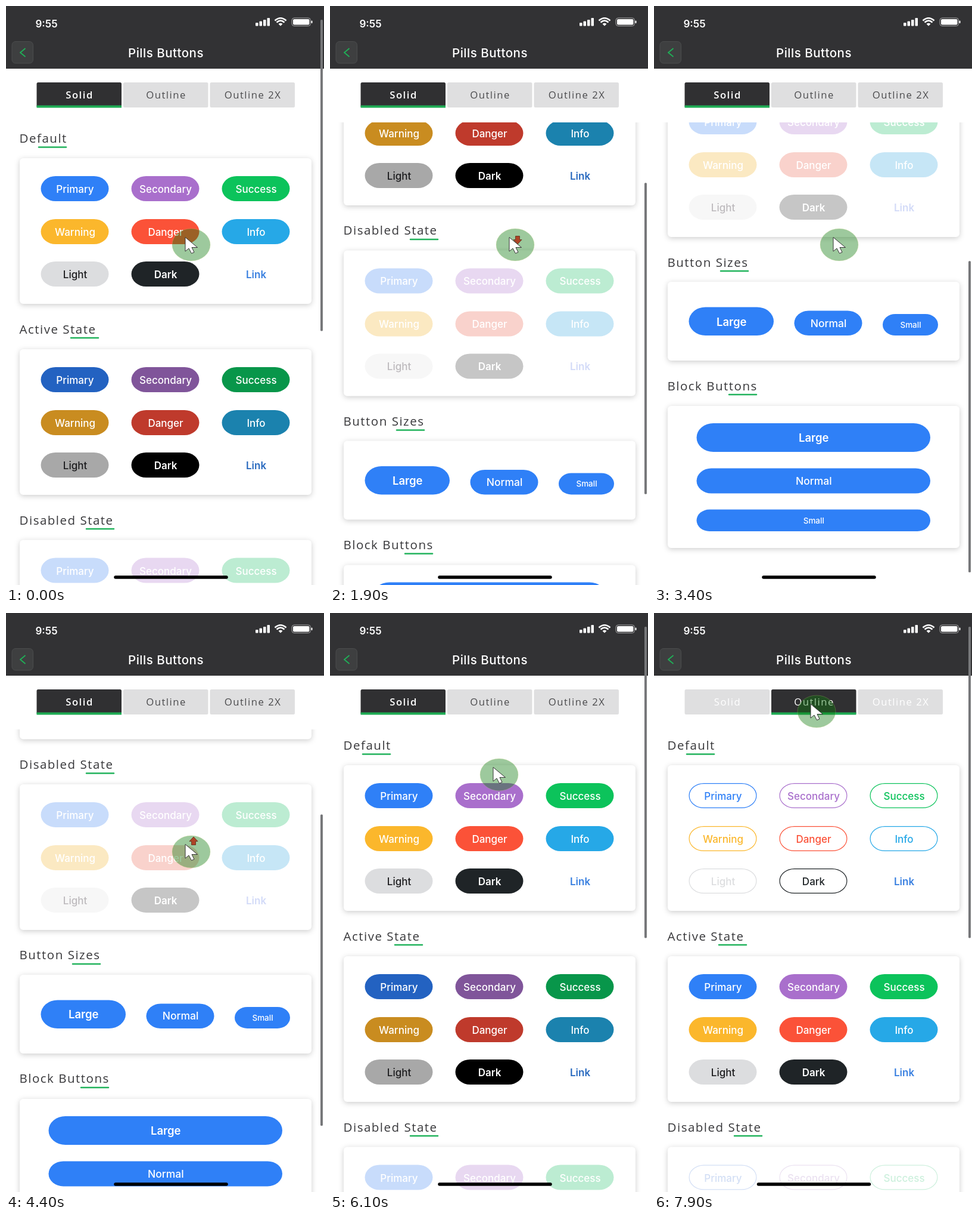
An HTML page that plays this animation: 534x970 px, repeating every 8 s.

```html
<!DOCTYPE html>
<html lang="en">
<head>
<meta charset="utf-8">
<title>Pills Buttons</title>
<style>
html, body { margin: 0; width: 100%; height: 100%; overflow: hidden; background: #fff; }
svg { display: block; width: 534px; height: 970px; font: 500 17px Inter, "Open Sans", sans-serif; }
.mid { text-anchor: middle; }
.bold { font-weight: 600; }
.head, .tab { font-family: "Open Sans", "Noto Sans", sans-serif; font-weight: 400; letter-spacing: 1.5px; }
.head { font-size: 20.5px; fill: #37373a; }
.tab { font-size: 16.7px; }
.tab.bold { font-weight: 600; }
.line { stroke: #22b35c; stroke-width: 2.5; stroke-linecap: round; }
.card { fill: #fff; filter: drop-shadow(0 2px 5px rgba(0,0,0,.2)); }
</style>
</head>
<body>
<svg viewBox="0 0 534 970">
  <g id="page"><g id="solid"></g><g id="outline"></g></g>
  <rect y="100" width="534" height="95" fill="#fff"/>
  <g id="tabs"></g>
  <rect width="534" height="105" fill="#323234"/>
  <g fill="#fff">
    <text x="49.5" y="36" class="bold" font-size="17">9:55</text>
    <text x="268.5" y="86" class="mid" font-size="20.5" letter-spacing=".5">Pills Buttons</text>
    <rect x="419" y="28" width="4.5" height="5.5" rx="1"/>
    <rect x="425.5" y="25.5" width="4.5" height="8" rx="1"/>
    <rect x="432" y="23" width="4.5" height="10.5" rx="1"/>
    <rect x="438.5" y="20" width="4.5" height="13.5" rx="1"/>
    <rect x="482" y="22" width="27.5" height="9.5" rx="2"/>
    <rect x="512.5" y="24.5" width="2" height="4.5" rx="1"/>
    <path d="M457.5 30 Q461 27 464.5 30 L461 33.5Z"/>
  </g>
  <g fill="none" stroke="#fff">
    <path d="M451.5 24.5 Q461 16 470.5 24.5 M454.5 27.5 Q461 21.5 467.5 27.5" stroke-width="2.6"/>
    <rect x="480" y="20" width="31.5" height="13.5" rx="4" stroke="#a5a5a6"/>
  </g>
  <rect x="10" y="59.5" width="35.5" height="36.5" rx="6" fill="#3e3f40" stroke="#4b4c4d"/>
  <path d="M32.5 71 L24 78 L32.5 85" fill="none" stroke="#1fb157" stroke-width="1.8"/>
  <rect id="bar" x="528" y="23" width="4" height="521.5" rx="1.5" fill="#77787a"/>
  <path id="home" d="M184 957 H370" stroke="#000" stroke-width="5.5" stroke-linecap="round"/>
  <g id="cursor">
    <ellipse cx="10" cy="12.5" rx="32" ry="27" fill="#0a780a" fill-opacity=".4" stroke="#c8d278" stroke-opacity=".25"/>
    <path id="way" d="M14 -12.5 L21 -5 H17.5 V1 H10.5 V-5 H7Z" fill="#ad4426" stroke="#5e2a18" stroke-width=".8"/>
    <path d="M0 0 V23.5 L6 18.5 L10.5 27 L15 25 L11 17 H20.5Z" fill="#fff" stroke="#333"/>
  </g>
</svg>
<script>
const $ = id => document.getElementById(id);
const names = "Primary Secondary Success Warning Danger Info Light Dark Link".split(" ");
const base = "#2f80f7 #a96fcc #0cc35b #fbb72c #fb5238 #26a8e7 #dcdddf #1f2427 #3a80e0".split(" ");
const active = "#2362c1 #80559a #08964a #c98c20 #bf3a2c #1b82ae #a8a8a8 #000 #2a6abf".split(" ");
const faded = "#c8dcfb #e8d8f1 #bcecd2 #fbe9c2 #f9d2cc #c6e6f6 #f7f7f7 #c6c6c6 #d3dbf8".split(" ");
const pale = "#d3dff5 #ebe2f1 #cdf0dd #fbedd0 #f9ddd8 #d3ebf7 #f5f5f5 #d0d0d0 #d3dbf8".split(" ");

const heading = (label, y, x) =>
  `<text class="head" x="22.5" y="${y}">${label}</text><path class="line" d="M${x + 1} ${y + 7.5}h46"/>`;
const card = (y, h) => `<rect class="card" x="23" y="${y}" width="490" height="${h}" rx="6"/>`;

// The label sits "drop" pixels below the top edge; an outline is drawn inside the box.
function pill(label, x, y, w, h, drop, fill, ink, { line = "none", size = 17, bold = false } = {}) {
  const d = line == "none" ? 0 : .6;
  return `<rect x="${x + d}" y="${y + d}" width="${w - 2 * d}" height="${h - 2 * d}" rx="${h * .59}" ry="${h / 2 - d}"
      fill="${fill}" stroke="${line}" stroke-width="1.2"/>
    <text class="mid ${bold ? "bold" : ""}" x="${x + w / 2 + .5}" y="${y + drop}" font-size="${size}" fill="${ink}">${label}</text>`;
}

function palette(top, colors, hollow, lightInk) {
  return card(top, 244) + names.map((name, i) => {
    const x = [58.5, 210.5, 362.5][i % 3], y = top + [30, 102, 173][i / 3 | 0];
    const c = colors[i], link = name == "Link";
    const ink = hollow || link ? c : name == "Light" ? lightInk : "#fff";
    return pill(name, x, y, 114, 42, 28, hollow || link ? "none" : c, ink, {
      line: hollow && !link ? c : "none",
      bold: link || name == "Dark" && !hollow
    });
  }).join("");
}

const blue = (label, x, y, w, h, drop, size, bold) =>
  pill(label, x, y, w, h, drop, base[0], "#fff", { size, bold });

function content(hollow) {
  return heading("Default", 229, 54) + palette(255, base, hollow, "#1c1c1e") +
    heading("Active State", 548.5, 108) + palette(575, hollow ? base : active, false, "#1c1c1e") +
    heading("Disabled State", 868.5, 134) + palette(894.5, hollow ? pale : faded, hollow, "#bdbabd") +
    heading("Button Sizes", 1188, 111) + card(1213.5, 132) +
    blue("Large", 58.5, 1256, 142.5, 47.5, 31, 18.5, true) +
    blue("Normal", 235.5, 1262, 114, 41.5, 27, 17.5) +
    blue("Small", 384, 1267.5, 93, 36, 23, 13.5) +
    heading("Block Buttons", 1395, 125) + card(1421.5, 238) +
    blue("Large", 71.5, 1450.5, 392.5, 48, 31, 18.5, true) +
    blue("Normal", 71.5, 1526, 392.5, 42, 27.5, 17.5) +
    blue("Small", 71.5, 1595, 392.5, 36.5, 23.5, 13.5);
}

const tabs = chosen => ["Solid", "Outline", "Outline 2X"].map((label, i) => {
  const x = 51.5 + i * 145.5, on = i == chosen;
  return `<rect x="${x}" y="128" width="142.5" height="42" rx="2.5" fill="${on ? "#303032" : "#dfdfe0"}"/>
    ${on ? `<path d="M${x} 168.5h142.5" stroke="#1fab54" stroke-width="4"/>` : ""}
    <text class="mid tab ${on && !i ? "bold" : ""}" x="${x + 72}" y="155" fill="${on || chosen ? "#fff" : "#4b4b4d"}">${label}</text>`;
}).join("");

$("solid").innerHTML = content(false);
$("outline").innerHTML = content(true);

const ease = (t, start, end) => (1 - Math.cos(Math.PI * Math.min(1, Math.max(0, (t - start) / (end - start))))) / 2;
const scrollAt = t => 751.5 * (ease(t, 880, 2597.4) - ease(t, 3977.2, 5443.2));
let mode = -1;

function draw(now) {
  const t = Math.floor(now % 8000 / 100) * 100; // ten steps a second
  const next = t >= 7000 ? 1 : 0;
  if (next != mode) {
    mode = next;
    $("tabs").innerHTML = tabs(mode);
    $("solid").style.display = mode ? "none" : "";
    $("outline").style.display = mode ? "" : "none";
    $("home").setAttribute("transform", `translate(${-8.5 * mode})`);
  }
  $("page").setAttribute("transform", `translate(0 ${-scrollAt(t)})`);
  $("bar").setAttribute("y", 23 + scrollAt(t + 35) * .538); // the bar runs slightly ahead

  const p = ease(t, 5550, 6585);
  $("cursor").setAttribute("transform", `translate(${301 - 38 * p ** .57} ${387.5 - 235 * p})`);
  const down = t >= 900 && t < 2700, up = t >= 3900 && t < 5400;
  $("way").style.display = down || up ? "" : "none";
  $("way").setAttribute("transform", down ? "translate(0 -1) scale(1 -1)" : "");
  requestAnimationFrame(draw);
}
requestAnimationFrame(draw);
</script>
</body>
</html>
```
